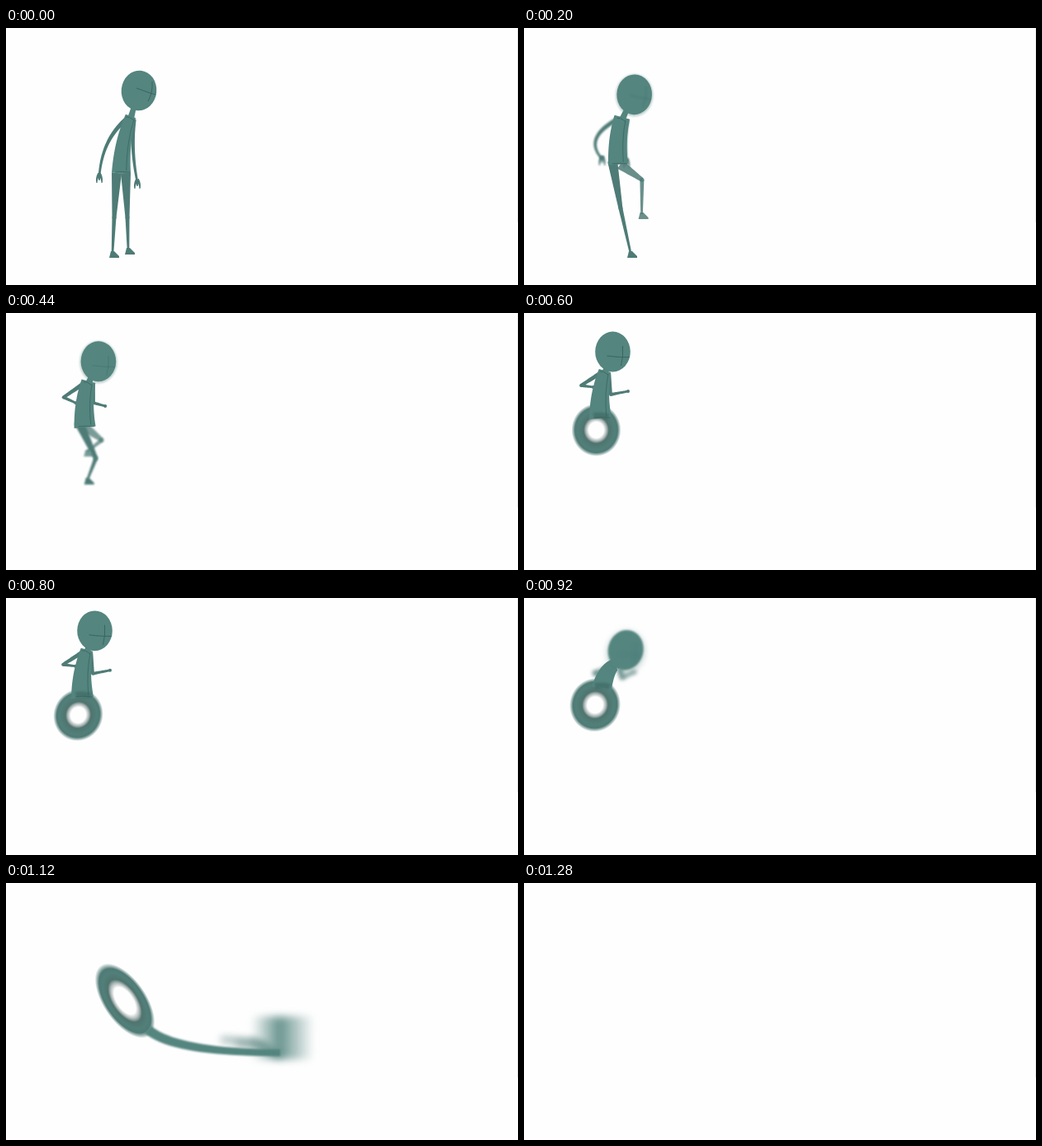
Animation of 620x312 px, one loop 1.32 s. Source, as an HTML page with a canvas:

```html
<!DOCTYPE html>
<html lang="en">
<head>
<meta charset="utf-8">
<title>Wind-up dash</title>
<style>
  html, body { margin: 0; height: 100%; overflow: hidden; background: #fefefe; }
  canvas { display: block; }
</style>
</head>
<body>
<canvas width="620" height="312"></canvas>
<script>
const ctx = document.querySelector('canvas').getContext('2d');
const LOOP = 1320, STEP = 40, WINDUP = 440, SPIN = 600, LAUNCH = 1120, GONE = 1280;
const BODY = '#54857f', LIMB = '#4e7b76', LINE = '#37605c';
const SKULL = [21.3, 24.4];

const clamp = v => Math.max(0, Math.min(1, v));
const linear = f => f;
const easeIn = f => f * f;
const easeOut = f => 1 - (1 - f) ** 2;
const smooth = f => f * f * (3 - 2 * f);

// Arms are elbow + hand, legs knee + foot, the wheel centre + radii + turn.
const stand = {
  head: [161, 76], turn: [.1], shoulder: [151, 107], bend: [140, 138], hip: [139.5, 176], width: [23, 13],
  backArm: [123, 140, 113, 180], frontArm: [154, 148, 159, 187],
  backLeg: [131, 230, 129, 273], frontLeg: [147, 230, 148, 269]
};
const kick = {
  head: [121, 83], turn: [0], shoulder: [104, 109], bend: [99, 132], hip: [102, 161], width: [24, 22],
  backArm: [71, 132, 86, 149], frontArm: [108, 130, 108, 150],
  backLeg: [110.5, 214, 129, 273], frontLeg: [141, 163, 140, 206]
};
const spin = {
  head: [107.5, 47], turn: [0], shoulder: [98, 70], bend: [90, 98], hip: [92.5, 128], width: [27, 15],
  backArm: [69, 88, 84, 90], frontArm: [105, 99, 126, 95],
  backLeg: [108, 158, 84, 168], frontLeg: [104, 150, 78, 150],
  wheel: [87.5, 142, 30, 32, 0]
};
const whip = {
  head: [168, 135], turn: [.95], shoulder: [150, 138], bend: [130, 69], hip: [98, 84], width: [17, 12],
  backArm: [132, 126, 136, 142], frontArm: [158, 116, 156, 100],
  wheel: [82, 95, 33.5, 35, 0]
};
const launch = {
  head: [335, 188], turn: [1.5], shoulder: [332, 206], bend: [205, 206], hip: [172, 178], width: [12, 8],
  backArm: [300, 193, 262, 190], frontArm: [310, 197, 280, 195],
  wheel: [144, 143, 26, 52, -.6]
};

const slide = (pose, dx, dy) => Object.fromEntries(Object.entries(pose).map(([part, v]) =>
  [part, /turn|width/.test(part) ? v : v.map((n, i) => n + (i % 2 ? dy : dx))]));

const coil = { ...slide(spin, 0, -9), wheel: spin.wheel };
const streak = { ...slide(launch, 1000, 0), hip: [820, 170], wheel: [790, 165, 150, 14, 0] };

const timeline = [
  { at: 0, pose: stand }, { at: 320, pose: kick, ease: smooth },
  { at: SPIN, pose: spin, ease: easeOut }, { at: 880, pose: coil, ease: smooth },
  { at: 1000, pose: whip, ease: smooth }, { at: LAUNCH, pose: launch, ease: easeIn },
  { at: GONE, pose: streak, ease: linear }
];

function poseAt(t) {
  const i = Math.max(1, timeline.findIndex(k => k.at >= t));
  const from = timeline[i - 1], to = timeline[i];
  const f = to.ease(clamp((t - from.at) / (to.at - from.at)));
  const result = {};
  for (const part in { ...from.pose, ...to.pose }) {
    const a = from.pose[part] ?? to.pose[part], b = to.pose[part] ?? a;
    result[part] = a.map((v, n) => v + (b[n] - v) * f);
  }
  return result;
}

const mid = (a, b) => [(a[0] + b[0]) / 2, (a[1] + b[1]) / 2];

function polygon(points) {
  ctx.beginPath();
  points.forEach(p => ctx.lineTo(...p));
  ctx.closePath();
  ctx.fill();
}

function dot([x, y], r) {
  ctx.beginPath();
  ctx.arc(x, y, r, 0, 7);
  ctx.fill();
}

// Tapered band along a quadratic curve
function ribbon([ax, ay], [cx, cy], [bx, by], wa, wb) {
  const left = [], right = [];
  for (let i = 0; i <= 20; i++) {
    const s = i / 20, r = 1 - s;
    const x = r * r * ax + 2 * r * s * cx + s * s * bx;
    const y = r * r * ay + 2 * r * s * cy + s * s * by;
    const dx = r * (cx - ax) + s * (bx - cx), dy = r * (cy - ay) + s * (by - cy);
    const h = (wa + (wb - wa) * s) / 2 / (Math.hypot(dx, dy) || 1);
    left.push([x - dy * h, y + dx * h]);
    right.unshift([x + dy * h, y - dx * h]);
  }
  polygon([...left, ...right]);
}

function limb(a, joint, b, [wa, wj, wb], curved) {
  if (curved) {
    const m = mid(a, b);
    return ribbon(a, [2 * joint[0] - m[0], 2 * joint[1] - m[1]], b, wa, wb);
  }
  ribbon(a, mid(a, joint), joint, wa, wj);
  dot(joint, wj / 2);
  ribbon(joint, mid(joint, b), b, wj, wb);
}

function stroke(a, c, b) {
  ctx.beginPath();
  ctx.moveTo(...a);
  ctx.quadraticCurveTo(...c, ...b);
  ctx.stroke();
}

function layer(blur, alpha, color, draw) {
  ctx.save();
  ctx.filter = blur > .5 ? `blur(${blur}px)` : 'none';
  ctx.globalAlpha *= alpha;
  ctx.fillStyle = ctx.strokeStyle = color;
  draw();
  ctx.restore();
}

function gradient(g, stops) {
  stops.forEach(s => g.addColorStop(...s));
  return g;
}

function drawArm([ex, ey, hx, hy], shoulder, t, blur) {
  const smudged = t > 960;
  layer(blur, smudged ? .6 : 1, LIMB, () => {
    limb(shoulder, [ex, ey], [hx, hy], smudged ? [4, 7, 6] : [5.5, 3.8, 2.6], t < WINDUP);
    if (t > 240) return dot([hx, hy], 2);
    for (const dx of [-3, 0, 3]) {
      ribbon([hx, hy - 3], [hx + dx * 1.2, hy + 2], [hx + dx, hy + (dx ? 8 : 5)], 4, 1.2);
    }
  });
}

function drawLeg([kx, ky, fx, fy], hip, blur, alpha) {
  layer(blur, alpha, LIMB, () => {
    limb(hip, [kx, ky], [fx, fy], [12, 5, 2.6]);
    polygon([[fx - 2, fy - 2], [fx + 2, fy - 2], [fx + 8, fy + 4], [fx + 8, fy + 6], [fx - 4, fy + 6]]);
  });
}

function drawWheel([x, y, rx, ry, turn], t) {
  const grown = clamp((t - WINDUP) / (SPIN - WINDUP)), size = .7 + .3 * grown;
  const wobble = t > SPIN && t < 1000 ? .4 * Math.sin((t - SPIN) / 400 * Math.PI) : 0;
  const hole = t < LAUNCH ? .34 : .4;
  const shade = gradient(ctx.createRadialGradient(0, 0, 0, 0, 0, 1), [
    [hole - .04, '#6a7d7b00'], [hole + .07, '#6a7d7b80'], [hole + .17, '#4f746f'],
    [.74, '#527f79'], [.86, '#4f7a75'], [1, '#4f7a7500']
  ]);
  layer(t > LAUNCH ? 4 : 0, grown, shade, () => {
    ctx.translate(x, y);
    ctx.rotate(turn + wobble);
    ctx.scale(rx * size, ry * size);
    dot([0, 0], 1);
  });
}

function drawHead([x, y], turn, t, blur) {
  const [rx, ry] = SKULL;
  if (t >= LAUNCH) {
    const smear = gradient(ctx.createLinearGradient(x - 38, 0, x + 38, 0),
      [[0, BODY + '00'], [.45, BODY + 'e0'], [1, BODY + '00']]);
    return layer(blur, 1, smear, () => ctx.fillRect(x - 38, y - 26, 76, 52));
  }
  const skull = (dy, grow) => {
    ctx.beginPath();
    ctx.ellipse(x, y + dy, rx + grow, ry + grow, turn, 0, 7);
    ctx.fill();
  };
  if (blur > .7) layer(blur * 1.5, .35, BODY, () => skull(blur, 1.5));
  layer(blur * .5, 1, BODY, () => skull(0, 0));
  if (t > 920) return;

  // Face guide lines level out as the figure straightens up.
  const k = clamp(t / 400), cx = x + 15 - 4 * k, cy = y + 2 + 4 * k, tilt = 5 - 4 * k;
  layer(blur, blur > .7 ? .3 : .85, LINE, () => {
    stroke([cx - 18, cy - tilt], [cx - 2, cy + 1], [x + rx - 1, cy + tilt * .6]);
    stroke([cx + 1, cy - 13], [cx + 2, cy], [cx - 4 + 3 * k, cy + 11]);
  });
}

function drawTorso({ hip, bend, shoulder, width: [hipW, topW] }, t) {
  layer(t > 920 ? .8 : 0, 1, BODY, () => ribbon(hip, bend, shoulder, hipW, topW));
  const [hx, hy] = hip, [sx, sy] = shoulder, off = hipW * .27;
  if (t < 920) layer(0, .7, LINE, () => {
    stroke([hx + off, hy - 3], [bend[0] + off, bend[1]], [sx + 4, sy + 4]);
    stroke([sx - 6, sy + 1], [sx - 2, sy], [sx + 4, sy + 5]);
    stroke([hx - hipW * .3, hy - 1], [hx, hy - 2], [hx + hipW * .45, hy - 1]);
  });
  if (t > WINDUP && t < 1040) layer(1, .5, LINE, () =>
    ribbon([hx - 8, hy - 3], [hx, hy - 5], [hx + 10, hy - 2], 7, 7));
}

function drawFigure(t) {
  const pose = poseAt(t), ahead = poseAt(t + STEP);
  const { head, shoulder: [sx, sy], hip: [hx, hy], width: [, topW] } = pose;
  const speed = Math.hypot(ahead.head[0] - head[0], ahead.head[1] - head[1]);
  const blur = Math.min(5, .33 * Math.sqrt(speed));
  ctx.globalAlpha = 1 - .9 * clamp((t - LAUNCH) / (GONE - LAUNCH));

  if (t > WINDUP) drawWheel(pose.wheel, t);
  if (t < 520) {
    const shown = clamp((520 - t) / 80), spread = 5.5 + 2 * clamp(t / 320);
    const lifted = clamp(t / 320);
    drawLeg(pose.frontLeg, [hx + spread * (1 - lifted), hy], lifted * 1.2, shown * (1 - .25 * lifted));
    drawLeg(pose.backLeg, [hx - spread, hy - 7 * lifted], t > 360 ? 1.2 : 0, shown);
  }
  if (t < LAUNCH) layer(0, 1, BODY, () => ribbon([sx, sy + 3], mid([sx, sy], head), head, 8, 3));
  drawArm(pose.backArm, [sx - topW * .35, sy + 3], t, blur);
  drawArm(pose.frontArm, [sx + topW * .3, sy + 4], t, blur);
  drawTorso(pose, t);
  drawHead(head, pose.turn[0], t, blur);
  ctx.globalAlpha = 1;
}

function frame(now) {
  const t = Math.floor(now % LOOP / STEP) * STEP;
  ctx.fillStyle = '#fefefe';
  ctx.fillRect(0, 0, 620, 312);
  if (t < GONE) drawFigure(t);
  ctx.fillStyle = '#ececec';
  ctx.fillRect(619, 0, 1, 236);
  requestAnimationFrame(frame);
}
requestAnimationFrame(frame);
</script>
</body>
</html>
```
